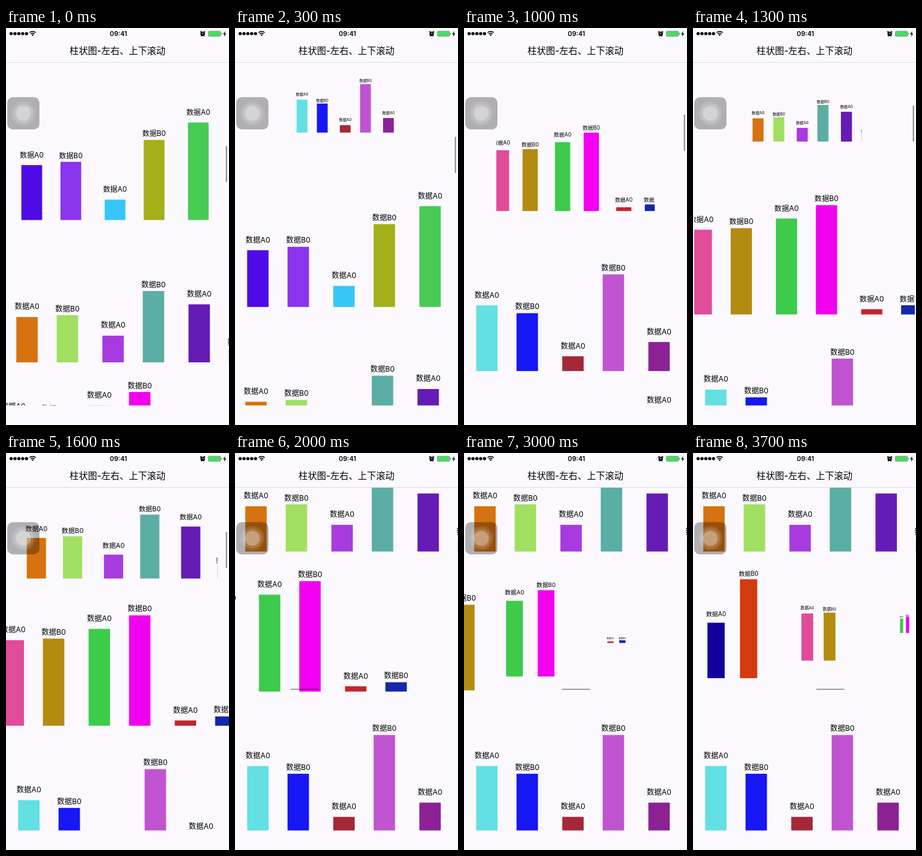
Write an HTML page with a canvas that moves like this. It is 360 by 640 pixels and loops after 3.8 s.

```html
<!DOCTYPE html>
<html lang="zh">
<head>
<meta charset="utf-8">
<style>
html, body { margin: 0; width: 100%; height: 100%; overflow: hidden; background: #fbf9fe; }
canvas, svg { position: absolute; left: 0; top: 0; width: 360px; height: 640px; }
text { font-family: Inter, "Noto Sans CJK SC", "Noto Sans CJK", sans-serif; text-anchor: middle; }
</style>
</head>
<body>
<canvas></canvas>
<svg viewBox="0 0 360 640">
  <rect width="360" height="55" fill="#fbf9fe"/>
  <rect y="55" width="360" height="1" fill="#dddbe0"/>
  <g id="dots"></g>
  <path d="M38 7.6a7 7 0 0 1 10 0M40 9.8a4.2 4.2 0 0 1 6 0" fill="none" stroke="#000" stroke-width="1.5"/>
  <path d="M43 13l-1.7-1.8a2.4 2.4 0 0 1 3.4 0z"/>
  <text x="181.500" y="13" font-size="10.500" font-weight="600">09:41</text>
  <circle cx="317.500" cy="9.500" r="3.600"/>
  <path d="M313.500 7l2-2M321.500 7l-2-2M315 13.500l1-1.500M320 13.500l-1-1.500" stroke="#000" stroke-width="1.300"/>
  <path d="M317.500 7.500v2.200h1.700" fill="none" stroke="#fbf9fe" stroke-width=".8"/>
  <rect x="326.500" y="5" width="20" height="8.500" rx="1.500" fill="#4cd964" stroke="#7c8a7e" stroke-width=".6"/>
  <rect x="347.300" y="7.500" width="1.400" height="3.500" rx=".7" fill="#7c8a7e"/>
  <path d="M354 5l-3.500 5h2.200l-.7 4 3.500-5h-2.200z"/>
  <text x="180" y="42.300" font-size="14.800" font-weight="500">柱状图-左右、上下滚动</text>
  <rect x="2" y="111.500" width="52" height="52" rx="9" fill="#000" fill-opacity=".3"/>
  <g fill="#fff">
    <circle cx="28" cy="137.500" r="19.500" fill-opacity=".11"/>
    <circle cx="28" cy="137.500" r="16" fill-opacity=".13"/>
    <circle cx="28" cy="137.500" r="12" fill-opacity=".3"/>
  </g>
</svg>
<script>
const LOOP = 3800, STEP = 100, GROW = 950;
const PITCH = 225.8, PAIR = 139, MID = 111, BAR = 34.6, GAP = 32.6;

// Bars as [height, colour], alternating A and B
const rowA = [[91.5, '#4e0be6'], [97, '#8a34ed'], [34, '#38c6f8'], [133.5, '#a4b018'], [162.5, '#48cb55']];
const rowB = [[73, '#d6720f'], [76, '#a1df62'], [43, '#a83be0'], [115, '#5aaea3'], [93.5, '#651bb5'], [22, '#666']];
const rowC = [[156.2, '#3dcb4c'], [178, '#f000ef'], [8.5, '#c0272f'], [15, '#1527ab'],
              [111, '#12009c'], [198, '#d43a10'], [138, '#e04c9a'], [140.5, '#b38b10']];
const rowD = [[105.8, '#62e0e4'], [93.3, '#1716f5'], [23.8, '#a42838'], [155.8, '#c054d0'], [46.8, '#8c2196']];

// Scroll positions as [time, value]
const scrollY = [[-700, -5], [0, 313.2], [700, 633], [1300, 914.5], [1450, 929], [1850, 836.2]];
const scrollX = [[1840, -94.8], [1920, -63], [2000, 0], [2100, 72], [2330, 215], [2600, 330.5],
                 [2700, 360], [3000, 537.5], [3200, 632], [3550, 775], [3700, 859]];
// Times at which pairs 2, 3, ... of the sideways row come into view
const pairStart = [1935, 2128, 2355, 2715, 3035, 3225, 3567];

const canvas = document.querySelector('canvas'), g = canvas.getContext('2d');
const dpr = window.devicePixelRatio || 1;
canvas.width = 360 * dpr;
canvas.height = 640 * dpr;

document.getElementById('dots').innerHTML =
  [0, 1, 2, 3, 4].map(i => `<circle cx="${8.3 + 6.2 * i}" cy="9" r="2.6"/>`).join('');

const clamp = v => Math.max(0, Math.min(1, v));

function curve(pts, t) {
  const n = pts.length - 1;
  if (t >= pts[n][0]) return pts[n][1];
  if (t <= pts[0][0]) return pts[0][1];
  const slope = i => i <= 0 || i >= n ? 0 :
    (pts[i + 1][1] - pts[i - 1][1]) / (pts[i + 1][0] - pts[i - 1][0]);
  const i = pts.findIndex(p => p[0] > t) - 1;
  const [t0, a] = pts[i], [t1, b] = pts[i + 1], d = t1 - t0, u = (t - t0) / d;
  return a + (b - a) * u * u * (3 - 2 * u)
    + d * u * (1 - u) * (slope(i) * (1 - u) - slope(i + 1) * u);
}

function grow(t, start) {
  const u = clamp((t - start) / GROW);
  return .1 + .9 * u * u * (3 - 2 * u);
}

function scaled(x, y, s, draw) {
  g.save();
  g.translate(x, y);
  g.scale(s, s);
  g.translate(-x, -y);
  draw();
  g.restore();
}

function bar(x, base, item, isB) {
  if (!item) return;
  const [h, colour] = item;
  g.fillStyle = colour;
  g.fillRect(x - BAR / 2, base - h, BAR, h);
  g.fillStyle = '#000';
  g.fillText(isB ? '数据B0' : '数据A0', x, base - h - (isB ? 6.3 : 12.6));
}

function pair(x, base, data, k, s = 1) {
  scaled(x, base - MID, s, () => {
    bar(x - GAP, base, data[2 * k], false);
    bar(x + GAP, base, data[2 * k + 1], true);
  });
}

function row(base, s, draw) {
  scaled(180, base - MID, s, () => {
    g.beginPath();
    g.rect(0, base - PITCH, 360, PITCH + 2);
    g.clip();
    draw(base);
  });
}

const still = (data, x) => base => {
  for (let k = 0; k < 3; k++) pair(x + PAIR * k, base, data, k);
};

function indicator(x, y, w, h, alpha) {
  g.fillStyle = `rgba(0,0,0,${.4 * alpha})`;
  g.beginPath();
  g.roundRect(x, y, w, h, 1);
  g.fill();
}

function render(t) {
  const y = curve(scrollY, t), x = curve(scrollX, t);
  g.setTransform(dpr, 0, 0, dpr, 0, 0);
  g.fillStyle = '#fbf9fe';
  g.fillRect(0, 0, 360, 640);
  g.font = '12px Inter, "Noto Sans CJK SC", "Noto Sans CJK", sans-serif';
  g.textAlign = 'center';
  g.save();
  g.beginPath();
  g.rect(0, 56, 360, 552.5);
  g.clip();

  const sideways = base => {
    for (let k = -2; k < 9; k++) {
      const cx = 88.5 + PAIR * k - x;
      if (cx > -70 && cx < 430) pair(cx, base, rowC, (k + 4) % 4, k < 2 ? 1 : grow(t, pairStart[k - 2]));
    }
  };
  row(y - 3 * PITCH, grow(t, 851), still(rowB, 66.5));
  row(y - 2 * PITCH, grow(t, 410), sideways);
  row(y - PITCH, grow(t, -141), still(rowD, 69.5));
  row(y, grow(t, -841), still(rowA, 69.5));
  row(y + PITCH, 1, still(rowB, 66.5));
  row(y + 2 * PITCH, 1, sideways);

  indicator(354.7, 190 - (y - 314) * .1085, 2.3, 58.5, clamp((2000 - t) / 200));
  indicator(89.5 + x * .1275, 380, 45.5, 1.8, clamp((t - 1800) / 100));
  g.restore();
}

function tick(now) {
  render(Math.floor((now % LOOP) / STEP) * STEP);
  requestAnimationFrame(tick);
}
requestAnimationFrame(tick);
</script>
</body>
</html>
```
